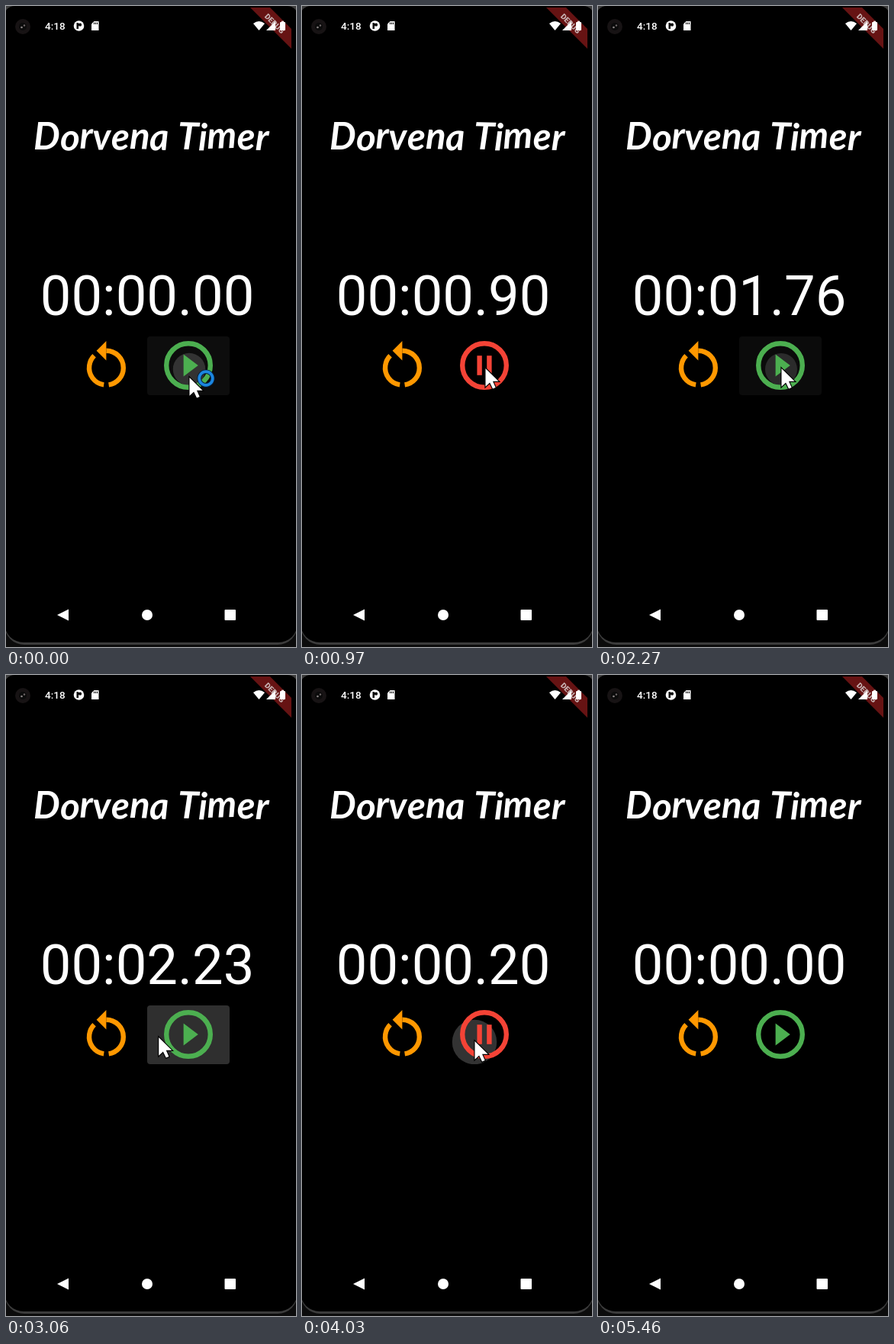
An HTML page with a canvas that plays this animation: 380 px wide and 840 px high, repeating every 5670 ms.

```html
<!DOCTYPE html>
<html lang="en">
<head>
<meta charset="utf-8">
<title>Dorvena Timer</title>
<style>
html, body { margin: 0; width: 100%; height: 100%; overflow: hidden; background: #000; }
canvas { display: block; width: 380px; height: 840px; }
</style>
</head>
<body>
<canvas id="stage" width="380" height="840" aria-label="Dorvena Timer"></canvas>
<script>
const ctx = document.getElementById('stage').getContext('2d');
const LOOP = 5670, SPEED = 1.1, BUSY = 120;
const GREEN = '#4caf50', RED = '#f44336', ORANGE = '#ff9800';
const ICON = 3.2, ICON_Y = 471;

const play = { left: 185, x: 239 };
const reset = { left: 77, x: 131.4 };

const TAPS = [
  { on: play, down: -30, up: 151 },
  { on: play, down: 1690, up: 1751 },
  { on: play, down: 2245, up: 2310 },
  { on: play, down: 2650, up: 2737.5 },
  { on: reset, down: 3380, up: 3440 },
  { on: play, down: 3800, up: 3848 },
  { on: play, down: 4290, up: 4312 },
  { on: reset, down: 4850, up: 4910 }
];
// Presses that slide off the button and do nothing
const DRAGS = [
  { on: play, down: 2790, up: 3090 },
  { on: reset, down: 4960, up: 5310 }
];
// Where the pointer rests
const STOPS = [
  { from: 0, to: 2840, x: 240, y: 475 },
  { from: 3060, to: 3060, x: 200, y: 475 },
  { from: 3330, to: 3520, x: 124, y: 478 },
  { from: 3780, to: 4060, x: 226, y: 480 },
  { from: 4300, to: 4600, x: 231, y: 481 },
  { from: 4830, to: 5000, x: 124, y: 481 },
  { from: 5390, to: LOOP, x: 50, y: 846 }
];

const clamp = v => Math.max(0, Math.min(1, v));
const lerp = (a, b, k) => a + (b - a) * k;
const white = alpha => `rgba(255,255,255,${alpha})`;

// Rises after down, stays until up + linger, then falls
function press({ down, up }, t, rise, linger, fall) {
  return clamp((t - down) / rise) * clamp(1 - (t - up - linger) / fall);
}

function pointerAt(t) {
  const i = STOPS.findIndex(s => t <= s.to);
  const a = STOPS[Math.max(0, i - 1)], b = STOPS[i];
  const k = i ? clamp((t - a.to) / (b.from - a.to)) : 1;
  return { x: lerp(a.x, b.x, k), y: lerp(a.y, b.y, k) };
}

// Replays the taps up to time t
function stopwatch(t) {
  let ms = 0, since = null;
  for (const { on, up } of TAPS) {
    if (up > t) break;
    if (on === reset) ms = 0;
    else if (since === null) since = up;
    else {
      ms += (up - since) * SPEED;
      since = null;
    }
  }
  const running = since !== null;
  return { running, ms: running ? ms + (t - since) * SPEED : ms };
}

function disc(x, y, r, color) {
  ctx.fillStyle = color;
  ctx.beginPath();
  ctx.arc(x, y, r, 0, 7);
  ctx.fill();
}

function arc(x, y, r, width, color, from = 0, to = 2 * Math.PI) {
  ctx.strokeStyle = color;
  ctx.lineWidth = width;
  ctx.beginPath();
  ctx.arc(x, y, r, from, to);
  ctx.stroke();
}

function poly(color, ...pts) {
  ctx.fillStyle = color;
  ctx.beginPath();
  for (let i = 0; i < pts.length; i += 2) ctx.lineTo(pts[i], pts[i + 1]);
  ctx.closePath();
  ctx.fill();
}

function box(x, y, w, h, r, color) {
  ctx.fillStyle = color;
  ctx.beginPath();
  ctx.roundRect(x, y, w, h, r);
  ctx.fill();
}

function text(str, x, y, font, color = '#fff', align = 'left') {
  ctx.font = font;
  ctx.fillStyle = color;
  ctx.textAlign = align;
  ctx.fillText(str, x, y);
}

function place(x, y, scale, angle, paint) {
  ctx.save();
  ctx.translate(x, y);
  ctx.rotate(angle);
  ctx.scale(scale, scale);
  paint();
  ctx.restore();
}

function shell() {
  ctx.fillStyle = '#0c0c0c';
  ctx.fillRect(0, 0, 380, 840);
  poly('#6a6a6a', 0, 0, 9, 0, 0, 9);
  poly('#3a3a3a', 371, 0, 380, 0, 380, 9);
  box(-2, -20, 384, 857, 26, '#3c3c3c');
  box(-2, 0, 384, 834, [13, 13, 25, 25], '#000');
}

function banner() {
  poly('#661313', 320, 2, 346, 2, 374, 30, 374, 56);
  place(352, 23, 1, Math.PI / 4, () =>
    text('DEBUG', 0, 3.5, '900 10px Roboto, sans-serif', '#c9b5b5', 'center'));
}

function statusBar() {
  disc(22, 27, 10, '#171314');
  disc(22, 27, 5, '#0b0b0b');
  disc(20.5, 28, 1.3, '#8b8484');
  disc(24, 25.5, 1.2, '#6f6768');
  text('4:18', 51, 31.3, '500 13.5px Roboto, sans-serif');

  disc(95.5, 26, 6.8, '#fff');
  box(92.5, 22, 2.5, 8, 0, '#000');
  box(95, 22.5, 4, 4, 1.5, '#000');

  poly('#fff', 115.5, 20, 121.5, 20, 121.5, 32, 112, 32, 112, 23.5);
  for (let i = 0; i < 3; i++) box(115 + i * 2, 21.5, 1, 2.5, 0, '#000');

  ctx.fillStyle = '#fff';
  ctx.beginPath();
  ctx.moveTo(331.5, 32);
  ctx.lineTo(324, 23);
  ctx.quadraticCurveTo(331.5, 17, 339, 23);
  ctx.fill();
  poly('#fff', 341, 32, 353, 20, 353, 32);
  box(359, 21, 7, 11, 1, '#fff');
  box(361, 19.7, 3, 2, 0, '#fff');
}

// Slightly uneven lettering, one glyph at a time
function heading() {
  const glyphs = [...'Dorvena Timer'];
  const face = px => `italic 700 ${px}px Lato, sans-serif`;
  ctx.font = face(50);
  const sum = glyphs.reduce((w, c) => w + ctx.measureText(c).width, 0);
  const font = face(50 * 308 / sum);
  let x = 36;
  glyphs.forEach((c, i) => {
    place(x, 188 + Math.sin(i * 2.3) * 1.2, 1, Math.sin(i * 1.7) * .03, () => text(c, 0, 0, font));
    ctx.font = font;
    x += ctx.measureText(c).width;
  });
}

function navBar() {
  poly('#fff', 67, 798, 82, 790.5, 82, 805.5);
  disc(185, 798, 7, '#fff');
  box(286.5, 791, 14.5, 14, 1, '#fff');
}

// The readout refreshes in alternating 60 and 30 ms steps
function clock(t) {
  const p = (t + 20) % 90;
  const cs = Math.floor(stopwatch(t - (p < 60 ? p : p - 60)).ms / 10);
  const two = n => String(n).padStart(2, '0');
  const str = `${two(Math.floor(cs / 6000))}:${two(Math.floor(cs / 100) % 60)}.${two(cs % 100)}`;
  text(str, 185.1, 405.2, '400 72.4px Roboto, sans-serif', '#fff', 'center');
}

function glow(tap, t, level, fall) {
  box(tap.on.left, 433, 108, 77, 4, white(level * press(tap, t, 60, 0, fall)));
}

function ripple(tap, t) {
  const alpha = .2 * press(tap, t, 40, 240, 80);
  if (!alpha) return;
  const { x, y } = pointerAt(tap.down);
  ctx.save();
  ctx.beginPath();
  ctx.roundRect(tap.on.left, 433, 108, 77, 4);
  ctx.clip();
  disc(x, y + 1, 20 + (t - tap.down) * .04, white(alpha));
  ctx.restore();
}

function ink(t) {
  for (const tap of TAPS) {
    glow(tap, t, .1, 150);
    ripple(tap, t);
  }
  for (const drag of DRAGS) glow(drag, t, .185, 120);
}

// Icons are drawn on a 24 unit grid around their centre
function restartIcon() {
  const gap = Math.asin(1 / 7), down = Math.PI / 2;
  arc(0, 1, 7, 2, ORANGE, -down, down - gap);
  arc(0, 1, 7, 2, ORANGE, down + gap, 2.5 * down);
  poly(ORANGE, 0, -10, -4, -6, 0, -2);
}

function toggleIcon(running) {
  const color = running ? RED : GREEN;
  arc(0, 0, 9, 2, color);
  if (running) {
    box(-3, -4, 2, 8, 0, color);
    box(1, -4, 2, 8, 0, color);
  } else {
    poly(color, -2, -4.5, 4, 0, -2, 4.5);
  }
}

function pointer(t) {
  const { x, y } = pointerAt(t);
  const busy = t < BUSY;
  const tip = busy ? y + 12 : y;
  if (busy) {
    arc(x + 22, tip + 1, 8.8, 5.6, '#06203c');
    arc(x + 22, tip + 1, 8.8, 3.8, '#1b86e0');
  }
  place(x + .5, tip, 1.4, 0, () => {
    poly('#fff', 0, 0, 0, 17, 4, 13.2, 6.8, 19, 9.4, 17.9, 6.8, 12, 12.2, 12);
    ctx.lineWidth = 1.6;
    ctx.strokeStyle = '#000';
    ctx.stroke();
    ctx.fill();
  });
}

function draw(t) {
  shell();
  banner();
  statusBar();
  heading();
  navBar();
  clock(t);
  ink(t);
  place(reset.x, ICON_Y, ICON, 0, restartIcon);
  place(play.x, ICON_Y, ICON, 0, () => toggleIcon(stopwatch(t).running));
  pointer(t);
}

const begin = performance.now();
function tick() {
  draw((performance.now() - begin) % LOOP);
  requestAnimationFrame(tick);
}
tick();
</script>
</body>
</html>
```
